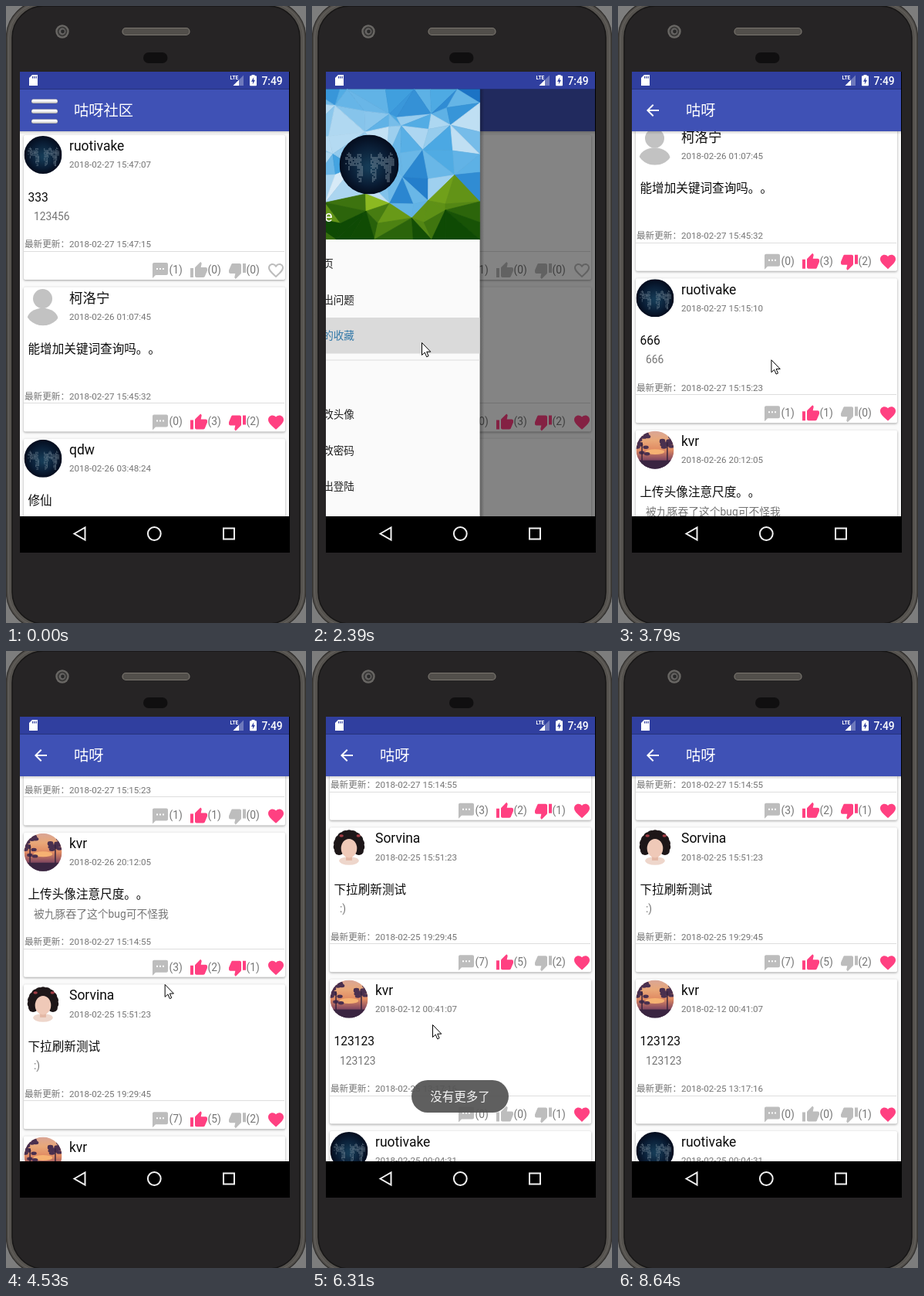
These frames come from a looping animation (389 px wide and 798 px high, 9420 ms). An HTML page with a canvas:

```html
<!DOCTYPE html>
<html lang="zh-CN">
<head>
<meta charset="utf-8">
<title>社区</title>
<style>
html, body { margin: 0; width: 100%; height: 100%; overflow: hidden; background: #7b7b7b; }
canvas { display: block; width: 389px; height: 798px; }
</style>
</head>
<body>
<canvas id="stage"></canvas>
<script>
const W = 389, H = 798, LOOP = 9420, TAU = Math.PI * 2;
const FONT = 'Roboto, "Noto Sans CJK SC", "Noto Sans CJK", sans-serif';
const GREY = '#bdbdbd', PINK = '#ff4081', SOFT = '#757575';
const SX = 18, SY = 85, SW = 349, BAR = 107.5, TOP = 162, NAV = 660, PITCH = 196.4;
const DRAWER = 287;

const dpr = window.devicePixelRatio || 1;
function setup(canvas) {
  canvas.width = Math.round(W * dpr);
  canvas.height = Math.round(H * dpr);
  const c = canvas.getContext('2d');
  c.scale(dpr, dpr);
  return c;
}
const main = setup(document.getElementById('stage'));
const sheet = document.createElement('canvas');
const sheetCtx = setup(sheet);
let g = main;

// ---------- motion ----------
const ramp = (t, a, b) => Math.min(1, Math.max(0, (t - a) / (b - a)));
const ease = (t, a, b) => { const k = ramp(t, a, b); return k * k * (3 - 2 * k); };

const drawerOpen = t => ease(t, 1060, 1260) - ease(t, 2302, 2542);
const scrolled = t => 325 * ease(t, 3720, 4350) + 203 * ease(t, 4690, 5170);

// Each glide: start, end, destination
const GLIDES = [
  [70, 930, 52, 134],       // menu button
  [1240, 1930, 142, 435],   // saved posts
  [2540, 3000, 192, 664],
  [3000, 3640, 198, 476],
  [3720, 4160, 204, 200],   // first drag
  [4200, 4650, 206, 480],
  [4690, 5170, 223, 258],   // second drag
  [5370, 5840, 156, 483],   // open a post
  [6500, 7260, 177, 671],
  [7260, 7650, 95, 684],    // back
  [7990, 8500, 223, 741]
];
function cursorAt(t) {
  let x = 291, y = 749;
  for (const [a, b, tx, ty] of GLIDES) {
    const k = ease(t, a, b);
    x += (tx - x) * k;
    y += (ty - y) * k;
  }
  return [x, y];
}

// ---------- drawing helpers ----------
function text(s, x, cy, size, color, align = 'left', weight = 400) {
  g.font = `${weight} ${size}px ${FONT}`;
  g.textAlign = align;
  g.fillStyle = color;
  // keep neighbouring full stops at full width
  g.fillText(s.replace(/。(?=。)/g, '。\u200b'), x, cy + size * .357);
}
function rect(x, y, w, h, color) {
  g.fillStyle = color;
  g.fillRect(x, y, w, h);
}
function round(x, y, w, h, r, fill, line, lw = 1) {
  g.beginPath();
  g.roundRect(x, y, w, h, r);
  if (fill) { g.fillStyle = fill; g.fill(); }
  if (line) { g.strokeStyle = line; g.lineWidth = lw; g.stroke(); }
}
function oval(x, y, rx, ry, color) {
  g.beginPath();
  g.ellipse(x, y, rx, ry, 0, 0, TAU);
  g.fillStyle = color;
  g.fill();
}
function poly(points, color) {
  g.beginPath();
  points.forEach(p => g.lineTo(p[0], p[1]));
  g.closePath();
  g.fillStyle = color;
  g.fill();
}
function blend(stops, x0, y0, x1, y1) {
  const gr = g.createLinearGradient(x0, y0, x1, y1);
  stops.forEach((c, i) => gr.addColorStop(i / (stops.length - 1), c));
  return gr;
}
function shadow(color, blur, dy) {
  g.shadowColor = color;
  g.shadowBlur = blur * dpr;
  g.shadowOffsetY = dy * dpr;
}
function boxed(x, y, w, h, draw) {
  g.save();
  g.beginPath();
  g.rect(x, y, w, h);
  g.clip();
  draw();
  g.restore();
}
const rnd = n => { const s = Math.sin(n * 127.1 + 311.7) * 43758.5453; return s - Math.floor(s); };
const mix = (a, b, k) => a.map((v, i) => v + (b[i] - v) * Math.min(1, Math.max(0, k)));
const rgb = c => `rgb(${c.map(Math.round).join()})`;
const bell = (v, mid, width) => Math.exp(-(((v - mid) / width) ** 2));

// ---------- icons on a 24 unit grid ----------
const ICONS = {
  chat: new Path2D('M20 2H4c-1.1 0-2 .9-2 2v18l4-4h14c1.1 0 2-.9 2-2V4c0-1.1-.9-2-2-2zM9 11H7V9h2zm4 0h-2V9h2zm4 0h-2V9h2z'),
  thumb: new Path2D('M1 21h4V9H1zM23 10c0-1.1-.9-2-2-2h-6.3l1-4.9c0-.4-.2-.8-.5-1L14.2 1 7.6 7.6C7.2 8 7 8.4 7 9v10c0 1.1.9 2 2 2h9c.8 0 1.5-.5 1.8-1.2l3-7.1c.1-.2.2-.4.2-.7z'),
  heart: new Path2D('M12 21.3l-1.5-1.3C5.4 15.4 2 12.3 2 8.5 2 5.4 4.4 3 7.5 3c1.7 0 3.4.8 4.5 2.1C13.1 3.8 14.8 3 16.5 3 19.6 3 22 5.4 22 8.5c0 3.8-3.4 6.9-8.5 11.5z'),
  back: new Path2D('M20 11H7.8l5.6-5.6L12 4l-8 8 8 8 1.4-1.4L7.8 13H20z')
};
function icon(name, x, y, color, mode) {
  g.save();
  g.translate(x, y);
  if (mode === 'down') { g.translate(24, 24); g.rotate(Math.PI); }
  if (mode === 'outline') {
    g.clip(ICONS[name]);
    g.strokeStyle = color;
    g.lineWidth = 4;
    g.stroke(ICONS[name]);
  } else {
    g.fillStyle = color;
    g.fill(ICONS[name], 'evenodd');
  }
  g.restore();
}

// ---------- avatars, drawn in a unit circle ----------
function isLand(x, y) {
  if (y < 0) return Math.abs(x + .12) > .13 && Math.abs(x) < .85 && y > -.45 + .2 * Math.abs(Math.sin(x * 9));
  return Math.cos(TAU * (x + .33) / .47) > y * 1.6 - .1 && Math.abs(x) < .72;
}
const avatars = {
  globe() {
    const gr = g.createRadialGradient(0, .1, .1, 0, 0, 1);
    gr.addColorStop(0, '#153a55');
    gr.addColorStop(.6, '#0a1e36');
    gr.addColorStop(1, '#040c1d');
    rect(-1, -1, 2, 2, gr);
    g.fillStyle = 'rgba(140,158,172,.55)';
    let n = 0;
    for (let y = -.5; y < .6; y += .05)
      for (let x = -.85; x < .85; x += .05)
        if (isLand(x, y) && rnd(n++) > .15) g.fillRect(x, y, .043, .043);
  },
  sunset() {
    rect(-1, -1, 2, 2, blend(['#d9a596', '#e9a878', '#e08a62', '#874b60', '#33223c'], 0, -1, 0, 1));
    oval(0, .1, .5, .14, '#f6b272');
    for (let i = 0; i < 30; i++) {
      const side = i % 2 ? 1 : -1;
      oval(side * (.35 + rnd(i) * .6), -.85 + rnd(i + 40) * (side > 0 ? .8 : 1.1), .15, .09, '#4a304f');
    }
    for (const x of [-.72, .62]) rect(x, -.4, .06, 1.2, '#35233d');
    rect(-1, .55, 2, .5, '#3a2541');
  },
  lady() {
    rect(-1, -1, 2, 2, '#fff');
    oval(0, .72, .52, .22, '#eed6cb');
    for (let i = 0; i < 13; i++) {
      const a = Math.PI * (.86 + i * .107);
      oval(Math.cos(a) * .58, Math.sin(a) * .6 - .08, .25, .24, '#1d1618');
    }
    oval(0, -.38, .55, .3, '#1d1618');
    for (const x of [-.4, .5]) oval(x, -.6, .11, .07, '#a23c44');
    rect(-.16, .35, .32, .35, '#e3b7a5');
    oval(0, .06, .42, .5, '#efc9b8');
  },
  blank() {
    oval(-.02, -.42, .51, .51, '#c2c2c2');
    g.beginPath();
    g.ellipse(-.02, .66, .82, .58, 0, Math.PI, TAU);
    g.ellipse(-.02, .66, .82, .34, 0, 0, Math.PI);
    g.fill();
  }
};
function avatar(kind, x, y, r) {
  g.save();
  g.translate(x, y);
  g.scale(r, r);
  g.beginPath();
  g.arc(0, 0, 1, 0, TAU);
  g.clip();
  avatars[kind]();
  g.restore();
}

// ---------- posts ----------
// marks: liked, disliked and saved by the viewer, e.g. 'L-S'
const post = (name, pic, made, title, body, edited, counts, marks) =>
  ({ name, pic, made, title, body, edited, counts, marks });
const globeUser = 'ruotivake';
const pinned = post('柯洛宁', 'blank', '2018-02-26 01:07:45', '能增加关键词查询吗。。', '',
  '2018-02-27 15:45:32', '032', 'LDS');
const numbers = post('kvr', 'sunset', '2018-02-12 00:41:07', '123123', '123123',
  '2018-02-25 13:17:16', '001', '--S');
const homePosts = [
  post(globeUser, 'globe', '2018-02-27 15:47:07', '333', '123456', '2018-02-27 15:47:15', '100', '---'),
  pinned,
  post('qdw', 'globe', '2018-02-26 03:48:24', '修仙', '', '2018-02-27 15:20:08', '000', '---')
];
const savedPosts = [
  pinned,
  post(globeUser, 'globe', '2018-02-27 15:15:10', '666', '666', '2018-02-27 15:15:23', '110', 'L-S'),
  post('kvr', 'sunset', '2018-02-26 20:12:05', '上传头像注意尺度。。', '被九豚吞了这个bug可不怪我',
    '2018-02-27 15:14:55', '321', 'LDS'),
  post('Sorvina', 'lady', '2018-02-25 15:51:23', '下拉刷新测试', ':)', '2018-02-25 19:29:45', '752', 'L-S'),
  numbers,
  post(globeUser, 'globe', '2018-02-25 00:04:31', '111', '', '2018-02-25 00:04:31', '000', '--S')
];

function card(p, y, grow = 0) {
  const l = -grow, r = grow;
  g.save();
  shadow('rgba(0,0,0,.36)', 3, 1);
  round(23 + l, y, 339 + 2 * grow, 187, 2, '#fff');
  g.restore();
  avatar(p.pic, 48 + l, y + 25.5, 24.5);
  text(p.name, 82 + l, y + 14, 17.5, '#0c0c0c');
  text(p.made, 82 + l, y + 38.3, 11.6, SOFT);
  text(p.title, 28.5 + l, y + 80, 15.6, '#0c0c0c');
  text(p.body, 36 + l, y + 105, 13.8, SOFT);
  text('最新更新：', 24 + l, y + 141.3, 11.6, SOFT);
  text(p.edited, 82 + l, y + 141.3, 11.6, SOFT);
  rect(23 + l, Math.round(y + 150), 338 + 2 * grow, 1, '#dedede');
  const tint = mark => p.marks.includes(mark) ? PINK : GREY;
  const iy = y + 163;
  icon('chat', 188 + r, iy, GREY);
  icon('thumb', 238 + r, iy, tint('L'));
  icon('thumb', 288 + r, iy, tint('D'), 'down');
  icon('heart', 338 + r, iy, tint('S'), p.marks.includes('S') ? '' : 'outline');
  [...p.counts].forEach((n, i) => text(`(${n})`, 211.5 + i * 50 + r, y + 174, 13.8, SOFT));
}
const feed = (posts, scroll) => posts.forEach((p, i) => card(p, 167 + i * PITCH - scroll));

// ---------- windows ----------
function page(title, content) {
  rect(SX, TOP, SW, NAV - TOP, '#fafafa');
  boxed(SX, TOP, SW, NAV - TOP, content);
  rect(SX, TOP, SW, 4, blend(['rgba(0,0,0,.17)', 'rgba(0,0,0,0)'], 0, TOP, 0, TOP + 4));
  rect(SX, BAR, SW, TOP - BAR, '#3f51b5');
  rect(SX, SY, SW, BAR - SY, '#303f9f');
  text(title, 88, 135.5, 19.3, '#fff');
}
function homePage() {
  page('咕呀社区', () => feed(homePosts, 0));
  for (const y of [120.5, 133.5, 146.5])
    round(33, y, 34, 5.5, 2.5, blend(['#ffffff', '#f0f0f0', '#a9a9a9'], 0, y, 0, y + 6), 'rgba(70,70,80,.45)', .6);
}
function savedPage(scroll) {
  page('咕呀', () => feed(savedPosts, scroll));
  icon('back', 33, 123, '#fff');
}
function detailPage() {
  page('问题详情', () => {
    card(numbers, 162, 5);
    g.save();
    shadow('rgba(0,0,0,.26)', 9, 4);
    oval(324, 616, 27, 27, '#fff');
    g.restore();
    icon('chat', 312, 604, GREY);
  });
  icon('back', 33, 123, '#fff');
}
// A window that fades while it slides vertically
function sliding(draw, k) {
  if (k <= 0) return;
  if (k >= 1) return draw();
  g = sheetCtx;
  g.clearRect(0, 0, W, H);
  draw();
  g = main;
  g.save();
  g.globalAlpha = Math.min(1, k * 1.6);
  g.drawImage(sheet, 0, 50 * (1 - k) ** 2, W, H);
  g.restore();
}

// ---------- drawer ----------
const DEEP = [4, 88, 182], AZURE = [70, 166, 226], CLOUD = [238, 245, 250];
const LEAF = [146, 190, 34], FOREST = [14, 74, 4];

function facetTone(x, y, n) {
  const edge = 146 - 16 * Math.cos((x - 115) / 70 * Math.PI);
  const jitter = rnd(n) - .5;
  if (y > edge) return mix(LEAF, FOREST, .15 + (y - edge) / 48 + jitter * .5);
  const light = .22 + .5 * bell(y, 55, 42) + .3 * (1 - x / DRAWER) * y / 100 + .4 * bell(y, edge, 22) + jitter * .4;
  return light < .5 ? mix(DEEP, AZURE, light * 2) : mix(AZURE, CLOUD, light * 2 - 1);
}
function landscape(x0) {
  const cols = 9, rows = 7, high = 302 - BAR;
  const node = (i, j) => [
    i / cols * DRAWER + (i % cols ? (rnd(i * 13 + j * 7) - .5) * 26 : 0),
    j / rows * high + (j % rows ? (rnd(i * 5 + j * 31 + 9) - .5) * 22 : 0)];
  let n = 1;
  for (let j = 0; j < rows; j++) for (let i = 0; i < cols; i++) {
    const a = node(i, j), b = node(i + 1, j), c = node(i, j + 1), d = node(i + 1, j + 1);
    for (const tri of (i + j) % 2 ? [[a, b, c], [b, d, c]] : [[a, b, d], [a, d, c]]) {
      const [cx, cy] = [0, 1].map(k => (tri[0][k] + tri[1][k] + tri[2][k]) / 3);
      const color = rgb(facetTone(cx, cy, n++));
      poly(tri.map(p => [p[0] + x0, p[1] + BAR]), color);
      g.strokeStyle = color;
      g.lineWidth = .7;
      g.stroke();
    }
  }
}
function menu(labels, x, y) {
  labels.forEach((s, i) => text(s, x, y + i * 46.6, 13.6, s === '我的收藏' ? '#3278a8' : '#212121'));
}
function drawer(shown, dim) {
  if (shown <= 0) return;
  const x = SX + shown - DRAWER, right = SX + shown;
  boxed(SX, BAR, SW, NAV - BAR, () => {
    rect(SX, BAR, SW, NAV - BAR, `rgba(0,0,0,${dim})`);
    rect(right, BAR, 6, NAV - BAR, blend(['rgba(0,0,0,.28)', 'rgba(0,0,0,0)'], right, 0, right + 6, 0));
    landscape(x);
    rect(x, 302, DRAWER, NAV - 302, '#fafafa');
    avatar('globe', x + DRAWER / 2, 205, 38.5);
    text(globeUser, x + 96, 272, 19.4, '#fff', 'right');
    rect(x, 403, DRAWER, 46.5, '#dadada');
    rect(x, 457.5, DRAWER, 1, '#dedede');
    menu(['首页', '提出问题', '我的收藏'], x + 70, 333.3);
    text('账户与安全', x + 15.5, 482, 13.6, SOFT);
    menu(['修改头像', '修改密码', '退出登陆'], x + 70, 528.3);
  });
}

// ---------- device ----------
function phone() {
  rect(0, 0, W, H, '#7d7d7d');
  round(.5, -7, 388, 813, 48, '#55524e', '#33312f', 1.5);
  round(3.5, -4, 382, 807, 45, null, '#65625e', 1);
  round(8, 0, 373, 799, 41, '#262425', '#171616', 1.5);
  oval(73, 33, 8.7, 8.7, '#6a6865');
  oval(73, 33, 6.4, 6.4, '#3a3938');
  oval(73, 33, 4.4, 4.4, '#666463');
  oval(73.5, 33, 2.4, 2.4, '#2a2a2a');
  round(151, 28.5, 87, 9, 4.5, '#524f4b', '#7a766f', 1.2);
  round(178, 60, 31.5, 14, 7, '#100f10');
  rect(SX, SY, 350, 707 - SY, '#000');
}
function statusIcons() {
  poly([[34, 89], [41, 89], [41, 103], [30, 103], [30, 93]], '#fff');
  for (const x of [34, 36.3, 38.6]) rect(x, 91, 1.2, 2.6, '#303f9f');
  text('LTE', 290.5, 92.5, 6.6, '#fff', 'left', 700);
  poly([[308, 89.5], [308, 103], [294.5, 103]], 'rgba(255,255,255,.3)');
  poly([[302, 95.5], [302, 103], [294.5, 103]], '#fff');
  rect(318.5, 89, 4, 2, '#fff');
  round(316, 90.2, 9, 13, 1, '#fff');
  poly([[321.3, 92], [318, 97.7], [320.2, 97.7], [319.7, 101.5], [323, 95.8], [320.9, 95.8]], '#303f9f');
  text('7:49', 331.5, 97, 13.8, '#fff', 'left', 500);
}
function navButtons() {
  g.strokeStyle = '#f2f2f2';
  g.lineWidth = 2;
  g.beginPath();
  g.moveTo(88.5, 682.5);
  g.lineTo(102.5, 674.5);
  g.lineTo(102.5, 690.5);
  g.closePath();
  g.stroke();
  g.beginPath();
  g.arc(192.3, 682.5, 8.4, 0, TAU);
  g.stroke();
  g.strokeRect(282, 675.5, 14, 14);
}
function toast(alpha) {
  if (alpha <= 0) return;
  g.save();
  g.globalAlpha = alpha;
  round(129, 555, 126, 42, 21, 'rgba(86,86,86,.94)');
  text('没有更多了', 192, 576, 15.5, '#f5f5f5', 'center');
  g.restore();
}
function cursor(x, y) {
  const shape = [[0, 0], [0, 16], [3.7, 12.6], [6.2, 18.3], [8.6, 17.2], [6.2, 11.7], [11.3, 11.7]];
  poly(shape.map(p => [x + .5 + p[0], y + .5 + p[1]]), '#fff');
  g.strokeStyle = '#000';
  g.lineWidth = 1;
  g.stroke();
}

function draw(t) {
  phone();
  boxed(SX, SY, SW, NAV - SY, () => {
    const saved = ramp(t, 2600, 2950);
    const detail = ramp(t, 6400, 6750) - ramp(t, 7700, 7960);
    if (saved < 1) {
      homePage();
      drawer(DRAWER * drawerOpen(t), .6 * drawerOpen(t - 20));
    }
    if (detail < 1) sliding(() => savedPage(scrolled(t)), saved);
    sliding(detailPage, detail);
    statusIcons();
    toast(ramp(t, 4760, 4910) - ramp(t, 6700, 6900));
  });
  navButtons();
  if (t >= 70 && t < 8640) cursor(...cursorAt(t));
}

let start;
function tick(now) {
  start ??= now;
  draw((now - start) % LOOP);
  requestAnimationFrame(tick);
}
draw(0);
requestAnimationFrame(tick);
</script>
</body>
</html>
```
